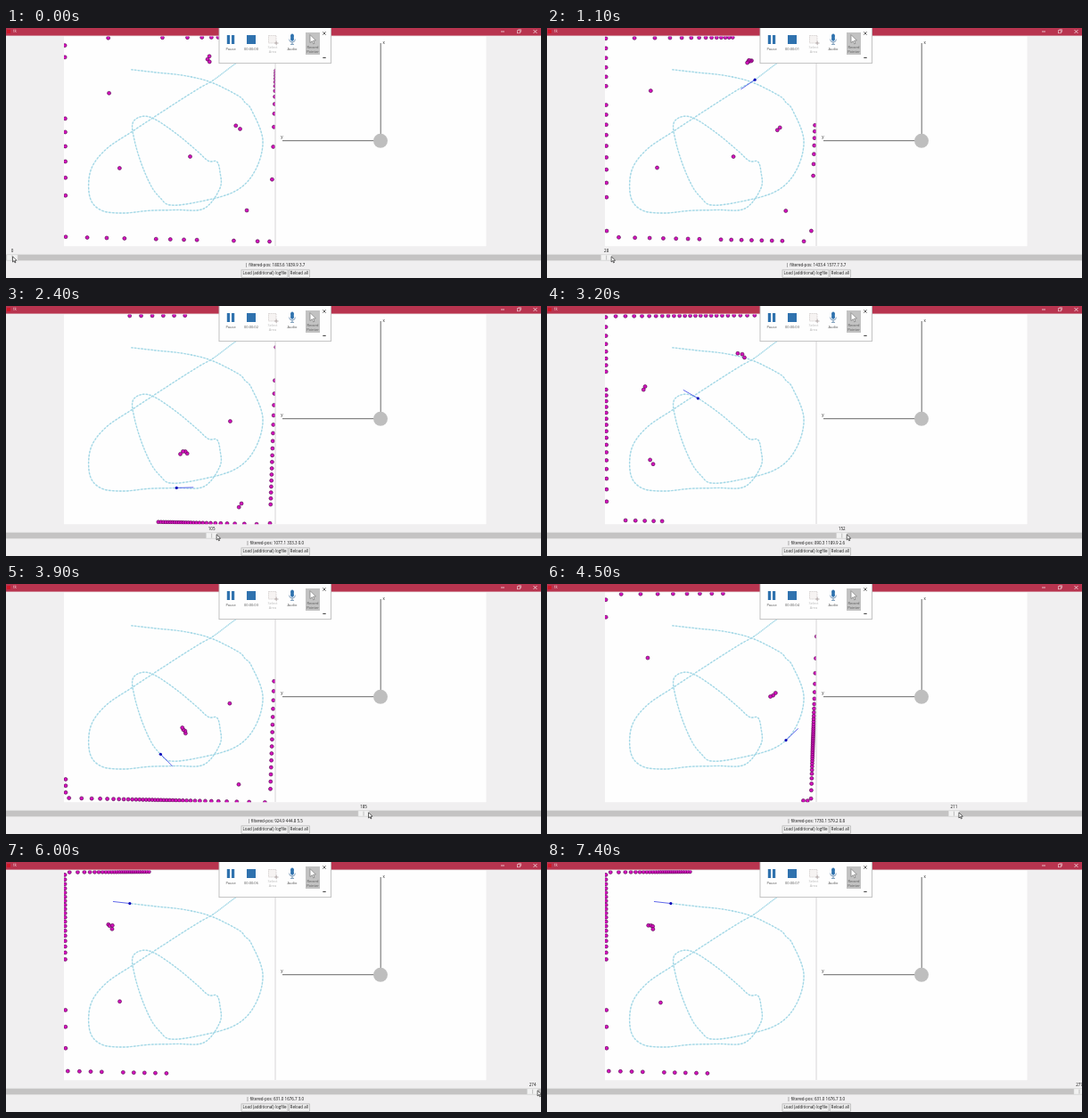
An HTML page with a canvas that plays this animation: 600 px wide and 281 px high, repeating every 7500 ms.

```html
<!DOCTYPE html>
<html lang="en">
<head>
<meta charset="utf-8">
<title>tk</title>
<style>
html, body { margin: 0; width: 100%; height: 100%; overflow: hidden; background: #f0f0f0; }
canvas { display: block; width: 600px; height: 281px; }
</style>
</head>
<body>
<canvas id="stage"></canvas>
<script>
const W = 600, H = 281, LOOP = 7500, TICK = 100;
const stage = document.getElementById('stage');
const ratio = window.devicePixelRatio || 1;
stage.width = W * ratio;
stage.height = H * ratio;
const g = stage.getContext('2d');
g.scale(ratio, ratio);

const SCALE = 0.1175, X0 = 64.7, Y0 = 243.6, RAD = Math.PI / 180;
const toPx = (x, y) => [X0 + x * SCALE, Y0 - y * SCALE];
const clamp = x => Math.min(1, Math.max(0, x));
const mix = (a, b, k) => a + (b - a) * k;
const ramp = (a, b, x) => { const k = clamp((x - a) / (b - a)); return k * k * (3 - 2 * k); };

// Slider drag: [time, value]
const DRAG = [[0, 0], [627, 0], [3200, 152.4], [3900, 185], [5100, 237], [6000, 274], [6700, 277]];

// The drive as legs, each starting at a known slider value
const LEGS = [
  { v: 0, path: [toPx(1803.6, 1839.9), [256, 41]] },
  { v: 28, path: [toPx(1433.4, 1577.7), [217, 67.5], [190, 84.5], [142, 116], [112, 136.5],
    [95, 160], [94, 190], [107, 205], [132, 208], [160, 205.3]] },
  { v: 105, path: [toPx(1077.1, 333.3), [222, 203], [240, 180], [240, 162], [236.5, 150], [227, 149.5],
    [213, 137], [190, 118], [166, 102], [152, 99.5], [142, 107], [144, 126], [152, 153], [163, 178]] },
  { v: 185, path: [toPx(924.9, 444.8), [184, 199], [213, 196], [256, 184], [279, 161], [288, 126], [275, 91.5]] },
  { v: 237, path: [toPx(1731.3, 1357.4), [261, 76.5], [230, 61], [200, 53.5], [169, 50]] },
  { v: 274, path: [toPx(631, 1676.7)] }
];

// What the scanner sees: four walls and six posts
const ROOM = [[66, 11.5], [304, 10], [296, 240], [67, 235]];
const POSTS = [[117, 72], [126, 157], [208.5, 146], [260, 112], [271, 206], [227, 36]];
const POST_R = 4.8, STEP = 3.6, RAYS = 31;

// Smooth curve through the waypoints, sampled with its running length
const SUB = 20, way = LEGS.flatMap(leg => leg.path), curve = [], run = [0];
const spline = (a, b, c, d, t) => b + 0.5 * t * (c - a + t * (2 * a - 5 * b + 4 * c - d + t * (3 * (b - c) + d - a)));
for (let i = 0; i < way.length - 1; i++) {
  const b = way[i], c = way[i + 1];
  const a = way[i - 1] || [2 * b[0] - c[0], 2 * b[1] - c[1]];
  const d = way[i + 2] || [2 * c[0] - b[0], 2 * c[1] - b[1]];
  for (let s = 0; s < SUB; s++) curve.push([0, 1].map(n => spline(a[n], b[n], c[n], d[n], s / SUB)));
}
curve.push(way[way.length - 1]);
for (let i = 1; i < curve.length; i++) {
  run[i] = run[i - 1] + Math.hypot(curve[i][0] - curve[i - 1][0], curve[i][1] - curve[i - 1][1]);
}
let count = 0;
const lengths = LEGS.map(leg => {
  const at = run[count * SUB];
  count += leg.path.length;
  return [leg.v, at];
});

// Piecewise linear lookup in [key, value] pairs
function lookup(pairs, x) {
  let i = 0;
  while (i < pairs.length - 2 && x >= pairs[i + 1][0]) i++;
  const [a, b] = [pairs[i], pairs[i + 1]];
  return mix(a[1], b[1], clamp((x - a[0]) / (b[0] - a[0])));
}

function poseAt(v) {
  const dist = lookup(lengths, v);
  let i = 1;
  while (i < run.length - 1 && run[i] < dist) i++;
  const f = (dist - run[i - 1]) / (run[i] - run[i - 1]);
  const [x, y] = [0, 1].map(n => mix(curve[i - 1][n], curve[i][n], f));
  const near = f > 0.5 ? i : i - 1;
  const p = curve[Math.max(0, near - 1)], q = curve[Math.min(curve.length - 1, near + 1)];
  const turn = Math.atan2(p[1] - q[1], q[0] - p[0]);
  return { x, y, heading: (turn + 2 * Math.PI) % (2 * Math.PI) };
}

const dashes = [];
for (let v = 0; v < 274; v++) dashes.push([poseAt(v), poseAt(v + 0.6)]);

function noise(a, b) {
  const n = Math.sin(a * 12.99 + b * 78.23) * 43758.55;
  return (n - Math.floor(n)) * 2 - 1;
}

function scan(pose, v) {
  // The position estimate slips in the lower half of the drive
  const drift = ramp(28, 95, v) * ramp(237, 195, v);
  const corners = ROOM.map(([x, y], i) => [x, y + (i > 1 ? 5.5 * drift : 0)]);
  const posts = POSTS.map(([x, y]) => [x - 9 * drift - pose.x, y + 19 * drift - pose.y]);
  const hits = [];
  for (let k = -RAYS; k <= RAYS; k++) {
    const a = pose.heading + (k * STEP - 3 - 5 * drift) * RAD;
    const dx = Math.cos(a), dy = -Math.sin(a);
    let reach = Infinity;
    corners.forEach((p, i) => {
      const q = corners[(i + 1) % 4], ex = q[0] - p[0], ey = q[1] - p[1];
      const px = p[0] - pose.x, py = p[1] - pose.y, det = dx * ey - dy * ex;
      const t = (px * ey - py * ex) / det, u = (px * dy - py * dx) / det;
      if (t > 0 && u >= 0 && u <= 1) reach = Math.min(reach, t);
    });
    for (const [px, py] of posts) {
      const along = px * dx + py * dy;
      if (along > 0 && along < reach && Math.abs(px * dy - py * dx) < POST_R) reach = along + 2 * noise(k, v);
    }
    hits.push([pose.x + dx * reach, pose.y + dy * reach]);
  }
  return hits;
}

function box(x, y, w, h, fill, edge, line = 0.6) {
  if (fill) { g.fillStyle = fill; g.fillRect(x, y, w, h); }
  if (edge) { g.strokeStyle = edge; g.lineWidth = line; g.strokeRect(x, y, w, h); }
}
function lines(color, width, ...segs) {
  g.strokeStyle = color;
  g.lineWidth = width;
  g.beginPath();
  for (const [a, b, c, d] of segs) { g.moveTo(a, b); g.lineTo(c, d); }
  g.stroke();
}
function disc(x, y, r, fill) {
  g.beginPath();
  g.arc(x, y, r, 0, 2 * Math.PI);
  g.fillStyle = fill;
  g.fill();
}
function text(s, x, y, color = '#111', size = 4.5, align = 'center') {
  g.font = size + 'px "Open Sans", "Noto Sans", sans-serif';
  g.textAlign = align;
  g.textBaseline = 'middle';
  g.fillStyle = color;
  g.fillText(s, x, y);
}
function arrow(x, y, size, fill, edge) {
  g.beginPath();
  [[0, 0], [0, 6.2], [1.5, 4.9], [2.5, 7.1], [3.4, 6.7], [2.4, 4.6], [4.4, 4.4]]
    .forEach(([a, b]) => g.lineTo(x + a * size, y + b * size));
  g.closePath();
  g.fillStyle = fill;
  g.fill();
  g.strokeStyle = edge;
  g.lineWidth = 0.7;
  g.stroke();
}

function drawWindow() {
  box(0, 0, W, H, '#f0eff0');
  box(0, 0, W, 8.6, '#b8344f');
  box(1, 2, 4, 4, '#d01828');
  text('tk', 8, 4.2, '#f0cdd4', 4.5, 'left');
  lines('#f3dfe3', 0.8, [555, 4, 559, 4], [591.5, 2, 595.5, 6], [595.5, 2, 591.5, 6]);
  box(573.5, 2.8, 3, 3, null, '#f3dfe3');
  lines('#f3dfe3', 0.6, [574.5, 1.8, 577.6, 1.8], [577.6, 1.8, 577.6, 4.8]);
  box(65, 9.5, 473.5, 235.7, '#fefefe');
}

function drawMap(pose, v) {
  g.save();
  g.beginPath();
  g.rect(65, 9.5, 237, 235.7);
  g.clip();
  lines('#a3d8e6', 1.4, ...dashes.map(([a, b]) => [a.x, a.y, b.x, b.y]));
  lines('rgba(163,216,230,.5)', 0.8, ...dashes.slice(1).map(([b], i) => [dashes[i][0].x, dashes[i][0].y, b.x, b.y]));
  const { x, y, heading } = pose;
  lines('#5058e8', 0.9, [x, y, x + 19 * Math.cos(heading), y - 19 * Math.sin(heading)]);
  disc(x, y, 1.6, '#0808b8');
  g.lineWidth = 0.6;
  g.strokeStyle = '#4a0845';
  for (const [hx, hy] of scan(pose, v)) {
    disc(hx, hy, 2, '#d512be');
    g.stroke();
  }
  g.restore();
  lines('#d4d2d4', 0.9, [302, 9.5, 302, 245]);
}

function drawAxes() {
  lines('#686868', 1, [420.2, 17, 420.2, 120], [310, 126.7, 413, 126.7]);
  disc(420, 126.8, 8, '#bebebe');
  text('x', 423.8, 16.4, '#222');
  text('y', 309.5, 123.2, '#222');
}

function drawPanel(sec) {
  box(239, -1, 125.5, 40.6, '#fefefe', '#bcbcbc', 0.9);
  const blue = '#2f72ae', soft = '#6a8fb0', pale = '#b9b9b9', ink = '#555';
  const label = (s, x, y, color = ink) => text(s, x, y, color, 4);
  box(247.8, 8, 3.2, 10, blue);
  box(253, 8, 3.2, 10, blue);
  label('Pause', 252, 24.2);
  box(270, 8, 10, 10, blue);
  label('00:00:0' + sec, 275, 24.2);
  g.setLineDash([1.4, 0.8]);
  box(294.5, 8.5, 8.5, 8.5, '#f6f3f2', '#c9c3c3', 0.7);
  g.setLineDash([]);
  lines('#b0a8a8', 0.9, [301, 17, 305.5, 17], [303.2, 14.8, 303.2, 19.2]);
  label('Select', 299, 22.4, pale);
  label('Area', 299, 27.2, pale);
  lines(blue, 3.6, [321, 8.4, 321, 13]);
  disc(321, 8.4, 1.8, blue);
  disc(321, 13, 1.8, blue);
  g.beginPath();
  g.arc(321, 12.6, 3.4, 0, Math.PI);
  g.strokeStyle = soft;
  g.lineWidth = 0.8;
  g.stroke();
  lines(soft, 0.9, [321, 16, 321, 18.4], [319, 18.4, 323, 18.4]);
  label('Audio', 321, 24.2);
  box(336, 5, 16, 25, '#c2c2c2');
  arrow(341, 7.6, 1.45, '#fff', '#777');
  label('Record', 344, 22.2);
  label('Pointer', 344, 27);
  lines('#444', 0.8, [355.3, 4.3, 358.7, 7.7], [358.7, 4.3, 355.3, 7.7]);
  lines('#444', 1.1, [355.3, 33.4, 358.7, 33.4]);
}

function drawControls(v, pose) {
  const x = 7 + v * 2.13;
  box(0, 254.6, W, 6.8, '#c4c3c3');
  box(x - 6, 255, 12, 6, '#f2f2f2', '#dadada', 0.5);
  lines('#a8a8a8', 0.7, [x, 255.6, x, 260.6]);
  text(v, x, 251.3);
  const wx = (pose.x - X0) / SCALE, wy = (Y0 - pose.y) / SCALE;
  text(`| filtered-pos: ${wx.toFixed(1)} ${wy.toFixed(1)} ${pose.heading.toFixed(1)}`, 302, 267.1);
  box(264, 271.9, 52, 8.6, '#f0f0f0', '#a2a2a2');
  text('Load (additional) logfile', 290, 276.2);
  box(317.2, 271.9, 23.2, 8.6, '#f0f0f0', '#a2a2a2');
  text('Reload all', 328.8, 276.2);
  // The pointer runs a little ahead of the thumb
  arrow(x + mix(0.5, 5.5, clamp(v / 28)), 256.8, 1, '#fff', '#222');
}

function draw(t) {
  const v = Math.round(lookup(DRAG, t)), pose = poseAt(v);
  drawWindow();
  drawMap(pose, v);
  drawAxes();
  drawControls(v, pose);
  drawPanel(Math.floor(t / 1000));
}

const start = performance.now();
function tick(now) {
  const t = Math.max(0, now - start) % LOOP;
  draw(Math.floor(t / TICK) * TICK);
  requestAnimationFrame(tick);
}
draw(0);
requestAnimationFrame(tick);
</script>
</body>
</html>
```
